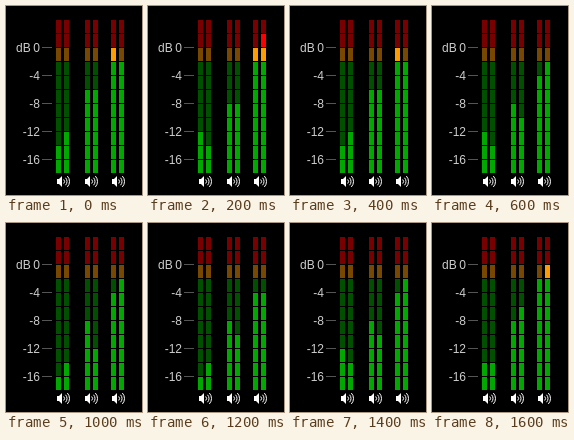
Animation, 136 px wide and 189 px high, one loop 1800 ms. Source, as an HTML page with a canvas:

```html
<!DOCTYPE html>
<html>
<head>
<meta charset="utf-8">
<title>Level meters</title>
<style>
html, body { margin: 0; width: 100%; height: 100%; overflow: hidden; background: #000; }
canvas { display: block; }
</style>
</head>
<body>
<canvas id="stage" width="136" height="189"></canvas>
<script>
const ctx = document.getElementById('stage').getContext('2d');
const STEP_MS = 200, SEGMENTS = 11, TOP = 14, PITCH = 14;
const barX = [50, 58, 79, 87, 105, 113];

// Lit segments per bar, counted from the bottom
const loud = [2, 3, 6, 6, 9, 8];
const peak = [3, 2, 5, 5, 9, 10];
const medium = [3, 2, 5, 4, 7, 8];
const quiet = [1, 2, 5, 4, 7, 7];
const dip = [1, 2, 5, 3, 7, 8];
const rise = [2, 2, 5, 6, 8, 9];
const sequence = [loud, peak, loud, medium, quiet, dip, quiet, medium, rise];

function segmentColor(row, lit) {
  if (row < 2) return lit ? '#ff0000' : '#780000';
  if (row === 2) return lit ? '#ff9c00' : '#784800';
  return lit ? '#00a800' : '#005000';
}

function drawBar(x, level) {
  for (let row = 0; row < SEGMENTS; row++) {
    ctx.fillStyle = segmentColor(row, row >= SEGMENTS - level);
    ctx.fillRect(x, TOP + row * PITCH, 5, 13);
  }
}

function drawScale() {
  ctx.font = '12px "Liberation Sans", Arial, sans-serif';
  ['0', '-4', '-8', '-12', '-16'].forEach((label, i) => {
    const y = 41 + i * 28;
    ctx.fillStyle = '#ccc';
    ctx.textAlign = 'right';
    ctx.fillText(label, 34, y + 5);
    ctx.fillStyle = '#555';
    ctx.fillRect(36, y, 10, 1);
  });
  ctx.fillStyle = '#ccc';
  ctx.textAlign = 'left';
  ctx.fillText('dB', 10, 46);
}

function drawSpeaker(x) {
  ctx.fillStyle = ctx.strokeStyle = '#fff';
  ctx.fillRect(x + 1, 173, 2, 5);
  ctx.beginPath();
  ctx.moveTo(x + 3, 173);
  ctx.lineTo(x + 6, 170);
  ctx.lineTo(x + 6, 181);
  ctx.lineTo(x + 3, 178);
  ctx.fill();
  for (const r of [3, 5.5, 8]) {
    ctx.beginPath();
    ctx.arc(x + 5.5, 175.5, r, -0.75, 0.75);
    ctx.stroke();
  }
}

function draw() {
  const step = Math.floor(performance.now() / STEP_MS) % sequence.length;
  ctx.fillStyle = '#000';
  ctx.fillRect(0, 0, 136, 189);
  drawScale();
  barX.forEach((x, i) => drawBar(x, sequence[step][i]));
  [50, 78, 105].forEach(drawSpeaker);
  requestAnimationFrame(draw);
}
draw();
</script>
</body>
</html>
```
